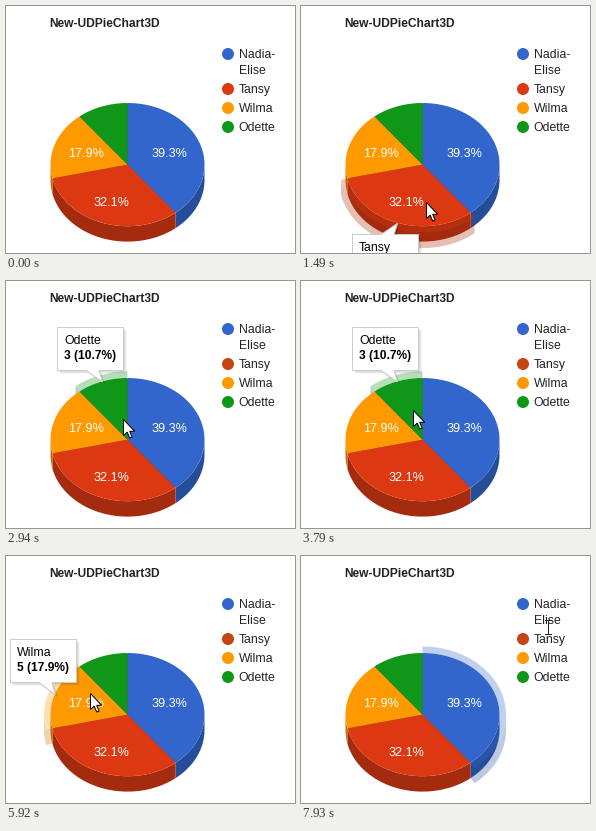
Recreate the animation shown at these times as a matplotlib script. Size 289 by 247 pixels, loop 8 s.

```python
import numpy as np
import matplotlib.pyplot as plt
from matplotlib.animation import FuncAnimation
from matplotlib.colors import to_rgb
from matplotlib.patches import Circle, Polygon

W, H, DPI = 289, 247, 64
LOOP, STEP = 8000, 20
PX = 72 / DPI  # points per pixel

# pie: the tilt squeezes it to 4/5, the wall is 1/5 of the radius high
CX, CY, RX = 121.5, 158.6, 77
RY, DEPTH, GLOW = 0.8 * RX, 0.2 * RX, 6.5
NAMES = ["Nadia-Elise", "Tansy", "Wilma", "Odette"]
COUNTS = np.array([11, 9, 5, 3])
COLORS = ["#3366cc", "#dc3912", "#ff9900", "#109618"]
DARK = [tuple(0.75 * np.array(to_rgb(c))) for c in COLORS]
SHARES = COUNTS / COUNTS.sum()
ENDS = 360 * np.cumsum(SHARES)
STARTS = ENDS - 360 * SHARES
MIDS = (STARTS + ENDS) / 2

# cursor: start ms, end ms, place reached
ENTRY = (177, 246)
MOVES = [
    (130, 640, (122, 203)),
    (1340, 1890, (154, 172)),
    (2510, 3090, (113, 129)),
    (3790, 3890, (111, 128)),
    (4040, 4570, (80, 140)),
    (5920, 6680, (241, 45)),
    (6760, 6930, (246, 44)),
    (7550, 7930, (246, 70)),
]
ARROW = np.array([(0, 0), (0, 16), (3.7, 12.6), (6.2, 18.6), (8.6, 17.6),
                  (6.2, 11.8), (11.2, 11.8)])
BEAM = np.array([(-3, -7), (3, -7), (0, -7), (0, 7), (-3, 7), (3, 7)])

fig = plt.figure(figsize=(W / DPI, H / DPI), dpi=DPI, facecolor="white")
ax = fig.add_axes([0, 0, 1, 1])
ax.set_xlim(0, W)
ax.set_ylim(H, 0)
ax.axis("off")


def rim(angle, grow=0, drop=0):
    """Points on the pie's edge, angles clockwise from the top."""
    a = np.radians(angle)
    return np.stack([CX + (RX + grow) * np.sin(a),
                     CY + drop - (RY + grow) * np.cos(a)], axis=-1)


def arc(a0, a1, grow=0, drop=0):
    return rim(np.linspace(a0, a1, 60), grow, drop)


def shape(points, color, z, **kw):
    kw.setdefault("lw", 0)
    return ax.add_patch(Polygon(points, closed=True, fc=color, zorder=z, **kw))


def text(x, y, s, z, size=12.3, color="#222222", **kw):
    return ax.text(x, y, s, fontsize=size * PX, color=color, zorder=z,
                   family="Liberation Sans", **kw)


def wall(i, color, z, grow=0, **kw):
    """Front side of a slice, if any of it faces the viewer."""
    a0, a1 = max(STARTS[i], 90), min(ENDS[i], 270)
    if a0 >= a1:
        return []
    outline = np.vstack([arc(a0, a1, grow), arc(a1, a0, grow, DEPTH)])
    return [shape(outline, color, z, **kw)]


def make_glow(i):
    a0, a1 = STARTS[i], ENDS[i]
    band = np.vstack([arc(a0, a1, GLOW), arc(a1, a0)])
    parts = [shape(band, COLORS[i], 3, alpha=0.3)]
    parts += wall(i, DARK[i], 3, GLOW, alpha=0.3)
    # cut ends of the band that face the viewer
    for a, visible in ((a0, a0 > 180), (a1, a1 < 180)):
        if visible:
            face = [rim(a), rim(a, GLOW), rim(a, GLOW, DEPTH),
                    rim(a, 0, DEPTH)]
            parts.append(shape(face, DARK[i], 3, alpha=0.3))
    return parts


def make_tip(i):
    """Callout whose pointer touches the middle of the slice's edge."""
    value = f"{COUNTS[i]} ({SHARES[i]:.1%})"
    width, height, gap, lean = 8 * len(value) - 6, 43, 11.3, 11.5
    x, y = rim(MIDS[i])
    below = y > CY + RY / 2
    left = np.floor(x + np.sign(x - CX) * lean - width / 2)
    top = np.floor(y + gap if below else y - gap - height)
    right, bottom = left + width, top + height
    near, far = (top, bottom) if below else (bottom, top)
    base = left + width / 2 + 2
    pts = np.array([(left, far), (left, near), (base - 6.5, near), (x, y),
                    (base + 6.5, near), (right, near), (right, far)]) + 0.5
    parts = [shape(pts + d, "black", 6, alpha=0.06) for d in (1, 2, 3)]
    parts.append(shape(pts, "white", 7, ec="#cccccc", lw=PX))
    parts.append(text(left + 7, top + 17, NAMES[i], 8, color="black"))
    parts.append(text(left + 7, top + 32, value, 8, size=12, color="black",
                      weight="bold"))
    return parts


def label_place(angle):
    """Farthest point along the slice's middle where a label still fits."""
    radii = np.array([RX, RY])
    way = np.array([np.sin(np.radians(angle)), -np.cos(np.radians(angle))])
    for r in np.linspace(1, 0, 200):
        corner = abs(r * way) + (18, 7) / radii
        if np.hypot(*corner) < 0.835:
            break
    return (CX, CY) + r * way * radii


text(43.5, 21, "New-UDPieChart3D", 5, size=12, weight="bold")

shape(arc(0, 360, -1), "#505050", 4)
for i, color in enumerate(COLORS):
    wall(i, DARK[i], 2)
    shape(np.vstack([(CX, CY), arc(STARTS[i], ENDS[i])]), color, 4)
    if SHARES[i] > 0.15:
        x, y = label_place(MIDS[i])
        text(x, y + 4.5, f"{SHARES[i]:.1%}", 5, size=12.6, color="white",
             ha="center")

dots = []
y = 48
for name, color in zip(NAMES, COLORS):
    dots.append(ax.add_patch(Circle((222, y), 6, fc=color, lw=0, zorder=5)))
    lines = name.replace("-", "-\n").split("\n")
    for k, line in enumerate(lines):
        text(232.5, y + 4 + 16 * k, line, 5)
    y += 3 + 16 * len(lines)

glows = [make_glow(i) for i in range(len(NAMES))]
tips = [make_tip(i) for i in range(len(NAMES))]
arrow = shape(ARROW, "white", 10, ec="black", lw=PX)
beam, = ax.plot(*BEAM.T, color="#222222", lw=PX, zorder=10)


def cursor_at(t):
    """Cursor place at t ms: eased, slightly bowed moves in 80 ms steps."""
    pos, rest = None, np.array(ENTRY)
    for t0, t1, goal in MOVES:
        if t < t0:
            break
        n = round((t1 - t0) / 80) + 1
        k = min(int((t - t0) * (n - 1) / (t1 - t0)), n - 1)
        u = (k + 1) / n
        u = u * u * (3 - 2 * u)
        dx, dy = np.array(goal) - rest
        dist = np.hypot(dx, dy)
        bow = min(dist / 4, 6) * np.sin(np.pi * u) / dist
        pos = rest + (u * dx + bow * dy, u * dy - bow * dx)
        rest = np.array(goal)
    return pos


def slice_at(x, y):
    for drop in (0, DEPTH):
        dx, dy = (x - CX) / RX, (y - drop - CY) / RY
        if dx * dx + dy * dy <= 1:
            angle = np.degrees(np.arctan2(dx, -dy)) % 360
            return int(np.searchsorted(ENDS, angle))
    return None


def show(parts, on):
    for p in parts:
        p.set_visible(on)


def update(n):
    t = n * STEP + STEP / 2
    pos = cursor_at(t)
    over, on_legend, on_text = None, False, False
    if pos is not None:
        x, y = pos
        over = slice_at(x, y)
        on_legend = 216 <= x <= 272 and 40 <= y <= 72
        on_text = on_legend and x >= 232
        spot = np.round(pos) + 0.5
        arrow.set_xy(ARROW + spot)
        beam.set_data(*(BEAM + spot).T)
    for i in range(len(NAMES)):
        show(glows[i], over == i or (on_legend and i == 0))
        show(tips[i], over == i)
    arrow.set_visible(pos is not None and not on_text)
    beam.set_visible(bool(on_text))
    # the second legend dot turns duller once the first callout has left it
    dots[1].set_facecolor(COLORS[1] if t < 2900 else "#c5440f")
    return []


anim = FuncAnimation(fig, update, frames=LOOP // STEP, interval=STEP,
                     repeat=True, repeat_delay=0, blit=False)
plt.show()
```
